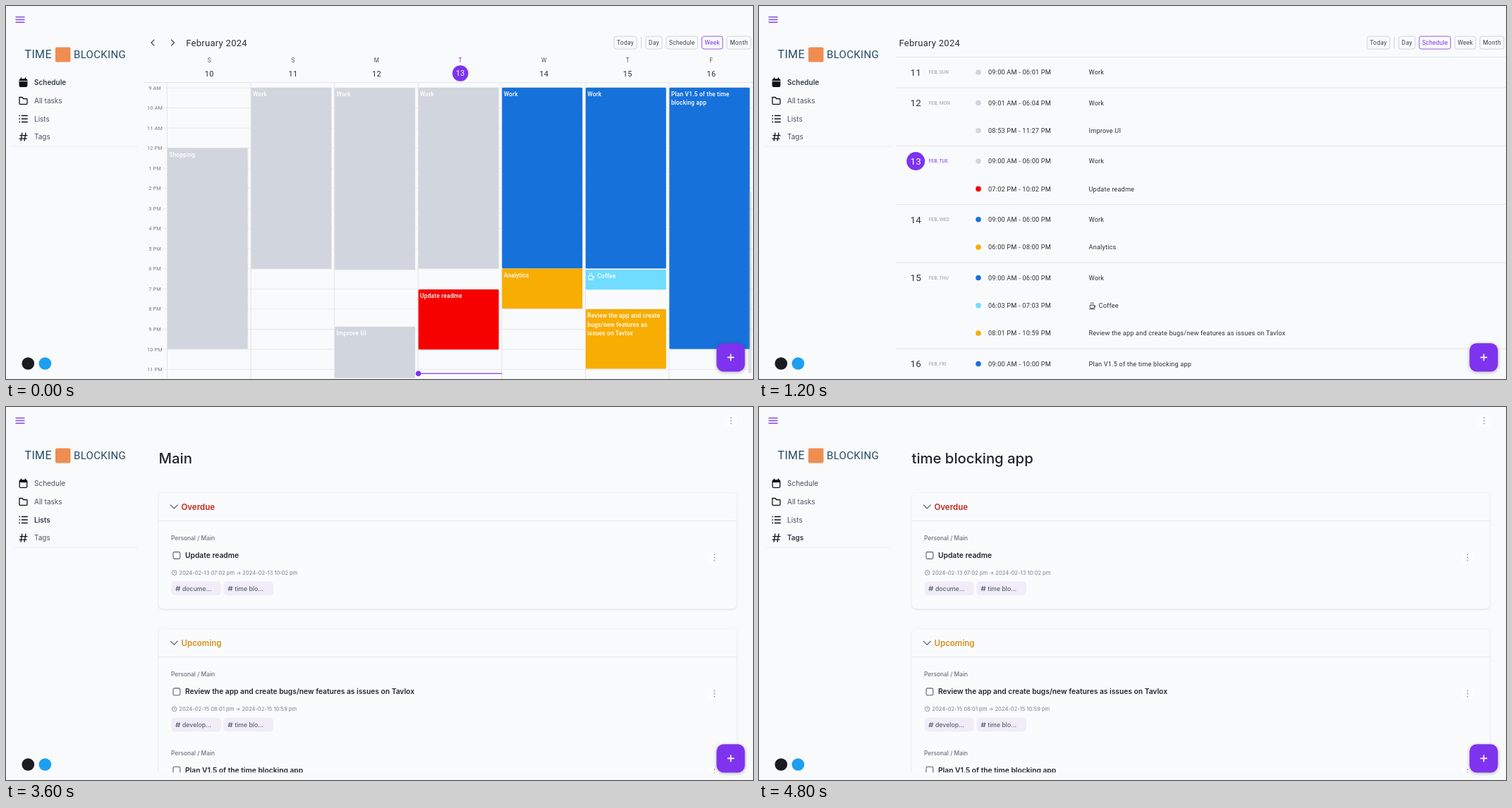
Write an HTML page that moves like this. It is 1059 px wide and 529 px high and loops after 5.4 s.

```html
<!DOCTYPE html>
<html lang="en">
<head>
<meta charset="utf-8">
<title>Time blocking</title>
<style>
  html, body { margin: 0; width: 100%; height: 100%; overflow: hidden; background: #f9fafc; }
  svg { display: block; }
  text { font-family: Inter, sans-serif; white-space: pre; }
  .r { font-family: Roboto, sans-serif; letter-spacing: .022em; }
  .card { filter: drop-shadow(0 1px 1px #0000001c); }
  .fab { filter: drop-shadow(0 1.5px 2.5px #00000048); }
</style>
</head>
<body>
<svg id="stage" width="1059" height="529"></svg>
<script>
const PURPLE = '#7e33ee', GRAY = '#d1d5dd', BLUE = '#1771da', RED = '#f60000',
      AMBER = '#f7ad02', CYAN = '#70dcff', RULE = '#e3e5ea', INK = '#20252f', MUTED = '#6b7280';
const LOOP = 5400, STEP = 600;

// Drawing helpers; text is centred vertically on y.
const text = (x, y, s, size, fill = INK, weight = 400, extra = '') =>
  `<text x="${x}" y="${y + size * .36}" font-size="${size}" fill="${fill}" font-weight="${weight}" ${extra}>${s}</text>`;
const roboto = (x, y, s, size, fill = '#303033', weight = 400, anchor = 'start') =>
  text(x, y, s, size, fill, weight, `class="r" text-anchor="${anchor}"`);
const mid = (x, y, s, size, fill, weight) => roboto(x, y, s, size, fill, weight, 'middle');
const rect = (x, y, w, h, fill, rx = 0, extra = '') =>
  `<rect x="${x}" y="${y}" width="${w}" height="${h}" rx="${rx}" fill="${fill}" ${extra}/>`;
const dot = (x, y, r, fill) => `<circle cx="${x}" cy="${y}" r="${r}" fill="${fill}"/>`;
const path = (d, stroke = RULE, width = 1, extra = '') =>
  `<path d="${d}" fill="none" stroke="${stroke}" stroke-width="${width}" ${extra}/>`;
const at = (x, y, s, k = 1) => `<g transform="translate(${x} ${y}) scale(${k})">${s}</g>`;
const hash = (x, y, color, k, width = 1.3) =>
  at(x, y, path('M-5 -2H6M-6 2.5H5M-1.5 -6L-3.5 6M3.5 -6L1.5 6', color, width), k);
const kebab = (x, y, boxed) =>
  (boxed ? rect(x - 8.5, y - 8.5, 17, 17, '#fdfdfe', 3) : '') +
  [-4, 0, 4].map(d => dot(x, y + d, .85, '#777b85')).join('');

// Frame around every page
const calendarIcon = solid =>
  rect(-5.3, -4.7, 10.6, 10.4, solid ? '#111' : 'none', 1.5, 'stroke="#111" stroke-width="1.3"') +
  path('M-3 -7V-4M3 -7V-4', '#111', 1.6) +
  (solid ? path('M-6 -2H6', '#f9fafc', .9) : rect(-5.5, -5, 11, 3.4, '#111'));
const folderIcon = path('M-5.5 -4.8H-1.5L.3 -2.8H4.6Q5.5 -2.8 5.5 -1.8V4Q5.5 5 4.5 5H-4.5Q-5.5 5 -5.5 4Z', '#111', 1.3);
const listIcon = path('M-2.6 -4.5H6.3M-2.6 0H6.3M-2.6 4.5H6.3', '#111', 1.4) +
  path('M-6 -4.5H-4.4M-6 0H-4.4M-6 4.5H-4.4', '#111', 1.5);

function sidebar(active, hover) {
  const items = [['Schedule', calendarIcon(active === 0)], ['All tasks', folderIcon],
                 ['Lists', listIcon], ['Tags', hash(0, 0, '#111', 1)]];
  return path('M13.5 15.6H26.5M13.5 19.4H26.5M13.5 23.2H26.5', '#9160df', 1.7) +
    text(26.5, 68.5, 'TIME', 16, '#264c68', 400, 'class="r"') +
    rect(70, 58.5, 21.5, 21, '#ef8d50', 2) +
    text(96, 68.5, 'BLOCKING', 15, '#264c68', 400, 'class="r"') +
    (hover ? rect(6, 149.5, 182, 22, '#ecebf5', 3) : '') +
    items.map(([label, icon], i) => {
      const y = 108.6 + 25.7 * i;
      return at(24.5, y, icon) +
        text(40, y, label, 10, i === active ? '#333a46' : '#4b5260', i === active ? 600 : 400);
    }).join('') +
    path('M9 199H187', '#eceef2') +
    dot(31.3, 507, 8.8, '#1b1c20') + dot(55.4, 507, 8.8, '#1d9ff0');
}
const fab = rect(1007.3, 478.2, 40.2, 40.2, PURPLE, 10, 'class="fab"') +
  path('M1022.7 498.4H1032.3M1027.5 493.6V503.2', '#fff', 1.6);

// Calendar pages
function toolbar(active, arrows = true) {
  const buttons = [['Today', 862, 32], ['Day', 907, 23], ['Schedule', 936, 44.5], ['Week', 986.5, 29.5], ['Month', 1022, 34]];
  return (arrows ? path('M210.3 47.8L206 52L210.3 56.2M234.2 47.8L238.5 52L234.2 56.2', '#4a4a4e', 1.3) : '') +
    roboto(arrows ? 255.2 : 198.4, 52, 'February 2024', 13) +
    path('M900.5 44V60', '#d3d4d8') +
    buttons.map(([label, x, w]) => {
      const on = label === active;
      return rect(x, 43, w, 18, 'none', 3, `stroke="${on ? '#9062dc' : '#d3d4d8'}"`) +
        mid(x + w / 2, 52, label, 8.6, on ? PURPLE : '#47474b');
    }).join('');
}

const LEFT = 228.8, COL = 118.6, HOUR = 28.53;
const hourY = h => 116 + (h - 9) * HOUR;
const clock = (h, m = 0) => h + m / 60;

// Event title; a leading cup is drawn as an icon.
function titled(x, y, s, size, fill, weight) {
  if (!s.startsWith('☕')) return roboto(x, y, s, size, fill, weight);
  const cup = path('M-3.6 -.5H2.6V2.2Q2.6 4 .8 4H-1.8Q-3.6 4 -3.6 2.2ZM2.6 .3Q4.8 .3 4.4 1.6T2.4 2.8' +
    'M-1.6 -1.8Q-2.6 -3 -1.4 -4.8M.9 -1.8Q-.1 -3 1.1 -4.8M-4.5 5H3.8', fill, .9);
  return at(x + 5.2, y, cup) + roboto(x + 14, y, s.slice(2), size, fill, weight);
}
function eventBox(x, w, start, end, color, lines, border) {
  const y = hourY(start) - .2, h = hourY(end) - y - .5;
  return rect(x, y, w, h, color, 1.5, border ? 'stroke="#aa92df" stroke-width="1.3"' : '') +
    lines.map((s, i) => titled(x + 2.5, y + 9.2 + 12.2 * i, s, 8.4, '#fff', 500)).join('');
}
function hourGrid() {
  let s = path('M195 108.5H1059');
  for (let h = 9; h < 24; h++) {
    const y = hourY(h);
    s += path(`M223 ${y}H1059`, '#e6e8ec') + mid(211, y, h < 12 ? h + ' AM' : (h % 12 || 12) + ' PM', 7.3, '#77787d');
  }
  return s;
}
const nowLine = (x1, x2) => path(`M${x1} 521.2H${x2}`, PURPLE, 1.5, 'stroke-opacity=".8"') + dot(x1, 521.2, 3.7, PURPLE);
const scrollbar = rect(1052, 263, 5, 258, '#85879033', 2);
const today = (x, y) => dot(x, y, 11.3, PURPLE) + mid(x, y, 13, 11, '#fff');

const WEEK_EVENTS = [
  [0, 12, 22, GRAY, 'Shopping'],
  [1, 9, clock(18, 1), GRAY, 'Work'],
  [2, clock(9, 1), clock(18, 4), GRAY, 'Work'],
  [2, clock(20, 53), clock(23, 27), GRAY, 'Improve UI'],
  [3, 9, 18, GRAY, 'Work'],
  [3, clock(19, 2), clock(22, 2), RED, 'Update readme'],
  [4, 9, 18, BLUE, 'Work'],
  [4, 18, 20, AMBER, 'Analytics'],
  [5, 9, 18, BLUE, 'Work'],
  [5, clock(18, 3), clock(19, 3), CYAN, '☕ Coffee'],
  [5, clock(20, 1), clock(22, 59), AMBER, 'Review the app and create|bugs/new features as|issues on Tavlox'],
  [6, 9, 22, BLUE, 'Plan V1.5 of the time|blocking app'],
];

function weekPage() {
  let s = toolbar('Week') + hourGrid();
  [...'SSMTWTF'].forEach((d, i) => {
    const x = LEFT + COL * i, c = x + 59.5;
    s += path(`M${x - .3} 108.5V529`) + mid(c, 77, d, 8.2, i === 3 ? PURPLE : '#55565a') +
      (i === 3 ? today(c, 95.5) : mid(c, 95.8, 10 + i, 11));
  });
  for (const [col, start, end, color, title] of WEEK_EVENTS)
    s += eventBox(LEFT + COL * col, 114, start, end, color, title.split('|'));
  return s + nowLine(LEFT + COL * 3, LEFT + COL * 4) + scrollbar;
}

function dayPage() {
  return toolbar('Day') + hourGrid() + path('M228.5 68V529') +
    mid(211, 77, 'TUE', 8.2, PURPLE) + today(211, 95.5) +
    eventBox(229.3, 825, 9, 18, GRAY, ['Work'], true) +
    eventBox(229, 825.5, clock(19, 2), clock(22, 2), RED, ['Update readme']) +
    nowLine(228.8, 1059) + scrollbar;
}

const time = t => {
  const m = Math.round(t * 60), h = Math.floor(m / 60), pad = n => String(n).padStart(2, '0');
  return `${pad(h % 12 || 12)}:${pad(m % 60)} ${h < 12 ? 'AM' : 'PM'}`;
};
function schedulePage() {
  const ROW = 39.3;
  let s = toolbar('Schedule', false), top = 72.5;
  for (let day = 1; day < 7; day++) {
    const on = day === 3, y = top + 21.5, events = WEEK_EVENTS.filter(e => e[0] === day);
    s += path(`M194 ${top}H1059`) + (on ? dot(222.2, y, 13, PURPLE) : '') +
      mid(222.3, y, 10 + day, 13.4, on ? '#fff' : undefined) +
      roboto(240.5, y, 'FEB, ' + ['SUN', 'MON', 'TUE', 'WED', 'THU', 'FRI'][day - 1], 6.6, on ? PURPLE : '#9a9ba1');
    events.forEach(([, start, end, color, title], i) => {
      const row = y + ROW * i;
      s += dot(311, row, 3.8, color) + roboto(325, row, `${time(start)} - ${time(end)}`, 9.2) +
        titled(467.5, row, title.replaceAll('|', ' '), 9.15, '#303033');
    });
    top += 4.1 + ROW * events.length;
  }
  return s;
}

function monthPage() {
  const w = 123.4, h = 88;
  let s = toolbar('Month');
  [...'SSMTWTF'].forEach((d, i) => s += mid(195 + w * (i + .5), 77, d, 8.2, '#55565a'));
  for (let i = 0; i < 35; i++) {
    const x = 195 + w * (i % 7), y = 89 + h * Math.floor(i / 7), day = new Date(2024, 0, 27 + i).getDate();
    s += path(`M${x} ${y + h}V${y}H${x + w}`) +
      (i === 17 ? today(x + w / 2, y + 13) : mid(x + w / 2, y + 13, day, 10));
    WEEK_EVENTS.filter(e => e[0] === i - 14).forEach(([, , , color, title], k) =>
      s += `<svg x="${x + 2}" y="${y + 27 + 17 * k}" width="${w - 5}" height="15">` +
        rect(0, 0, w - 5, 15, color, 2) + titled(3, 7.5, title.replaceAll('|', ' '), 8.4, '#fff', 500) + '</svg>');
  }
  return s;
}

// Task pages
const heading = s => text(216.5, 73, s, 20.3, INK, 500);
const create = (x, y, what) => text(x, y, '+ Create a new ' + what, 10, MUTED, 500);
const card = (y, h, head, title, color = INK) =>
  rect(216.5, y, 819.5, h, '#fafbfd', 6, 'class="card" stroke="#f0f2f5" stroke-width=".7"') +
  path(`M217 ${y + head}H1036`) +
  path(`M233 ${y + head / 2 - 2.8}l5.3 5.3l5.3 -5.3`, '#565b66', 1.2) +
  text(248.5, y + head / 2, title, 11.5, color, 600);

function listsPage() {
  const row = (y, name) => text(234, y, name, 10.2, INK, 600) + kebab(1004.5, y + .3);
  return heading('Lists') + card(121.5, 200.5, 51.5, 'Personal') + kebab(1016, 147.2) +
    row(204.5, 'Cart') + row(256, 'Main') + create(240, 299.5, 'list') +
    card(352, 104, 39.5, 'Other lists') + row(423.5, 'Work') +
    create(216.5, 484.7, 'folder') + create(216.5, 507.5, 'list');
}

function tagsPage() {
  const tags = [['time blocking app', '#a08be6'], ['development', '#8494ec'], ['documentation', '#ae83dc'],
                ['design', '#4fa9dc'], ['new project', '#a98ae8']];
  return heading('Tags') + tags.map(([name, color], i) => {
    const y = 128.8 + 39.9 * i;
    return hash(216.2, y, color, .65, 1.9) + text(223.8, y, name, 10.2, INK, 600) + kebab(1028, y + .5);
  }).join('') + create(216.5, 321, 'tag');
}

function task(y, title, day, from, to, tags) {
  return text(234, y, 'Personal / Main', 8.4, MUTED, 500) +
    rect(237, y + 19.6, 9.8, 9.8, 'none', 1.8, 'stroke="#5b606b" stroke-width="1.1"') +
    text(254, y + 24.5, title, 10.25, INK, 600) + kebab(1004.5, y + 27.3, true) +
    `<circle cx="238.6" cy="${y + 49}" r="3.3" fill="none" stroke="#8b909b"/>` +
    path(`M238.6 ${y + 47}v2.2h1.6`, '#8b909b', .8) +
    text(245.3, y + 49, `2024-02-${day} ${from} pm → 2024-02-${day} ${to} pm`, 7.5, '#8b909b', 500) +
    tags.map((tag, i) => {
      const x = 234.3 + 74.2 * i;
      return rect(x, y + 61.5, 70.5, 19.7, '#f0edf8', 5) + hash(x + 9.5, y + 71.4, '#555b68', .58, 1.8) +
        text(x + 15.7, y + 71.4, tag, 8.7, '#5b616e', 500);
    }).join('');
}
const tasksPage = (title, menu) => heading(title) + (menu ? kebab(1028, 19.5, true) : '') +
  '<svg width="1059" height="518.3">' +
  card(121.5, 164.5, 40, 'Overdue', '#c0281e') +
  task(186, 'Update readme', 13, '07:02', '10:02', ['docume...', 'time blo...']) +
  card(315, 320, 39.5, 'Upcoming', '#d5901f') +
  task(379.3, 'Review the app and create bugs/new features as issues on Tavlox', 15, '08:01', '10:59', ['develop...', 'time blo...']) +
  task(490.7, 'Plan V1.5 of the time blocking app', 16, '09:00', '10:00', ['time blo...']) + '</svg>';

const scenes = [
  sidebar(0) + weekPage() + fab,
  sidebar(0) + dayPage() + fab,
  sidebar(0) + schedulePage() + fab,
  sidebar(0) + monthPage() + fab,
  sidebar(1) + tasksPage('All tasks') + fab,
  sidebar(2, true) + listsPage(),
  sidebar(2) + tasksPage('Main', true) + fab,
  sidebar(3) + tagsPage(),
  sidebar(3) + tasksPage('time blocking app', true) + fab,
];

const stage = document.getElementById('stage');
let shown = -1;
function draw() {
  const scene = Math.floor(performance.now() % LOOP / STEP);
  if (scene !== shown) stage.innerHTML = scenes[shown = scene];
  requestAnimationFrame(draw);
}
draw();
</script>
</body>
</html>
```
